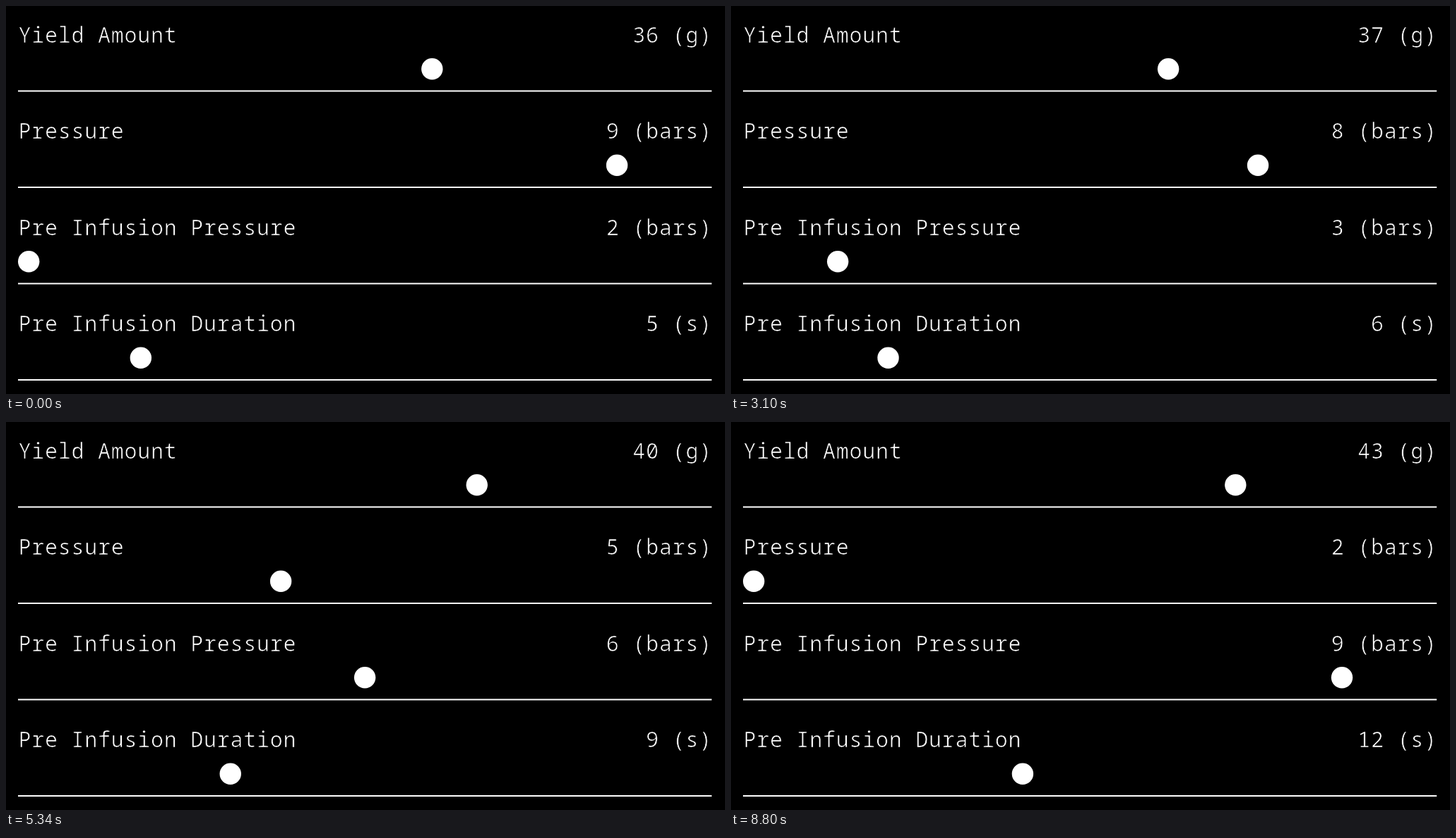
An HTML page that plays this animation: 1018x550 px, repeating every 8.9 s.

```html
<!DOCTYPE html>
<html lang="en">
<head>
<meta charset="utf-8">
<title>Brew settings</title>
<style>
  html, body { margin: 0; width: 100%; height: 100%; overflow: hidden; background: #000; }
  svg { display: block; width: 100vw; height: 100vh; }
  /* the black outline thins the letters to a light weight */
  text {
    font: 300 30px "Noto Sans Mono", "Liberation Mono", monospace;
    letter-spacing: .75px;
    fill: #fff;
    stroke: #000;
    stroke-width: .7;
    white-space: pre;
  }
  line { stroke: #fff; stroke-width: 2; }
  circle { fill: #fff; }
</style>
</head>
<body>
<svg id="stage" viewBox="0 0 1018 550"></svg>
<script>
const LOOP = 8900;
const FIRST_STEP = 2600, STEP = 760, STEPS = 7;
const LEFT = 17, RIGHT = 999.2, RADIUS = 15.2;
const PITCH = 136.5;   // row height
const CELL = 18.75;    // character advance
const INSET = .5;      // text offset
const BASELINE = 51.5;

const rows = [
  { label: "Yield Amount",          unit: "g",    start: 36, dir: 1,  min: 0, max: 60 },
  { label: "Pressure",              unit: "bars", start: 9,  dir: -1, min: 2, max: 10 },
  { label: "Pre Infusion Pressure", unit: "bars", start: 2,  dir: 1,  min: 2, max: 10 },
  { label: "Pre Infusion Duration", unit: "s",    start: 5,  dir: 1,  min: 0, max: 30 }
];

const stage = document.getElementById("stage");

function add(tag, attrs, content = "") {
  const el = document.createElementNS("http://www.w3.org/2000/svg", tag);
  for (const name in attrs) el.setAttribute(name, attrs[name]);
  el.textContent = content;
  return stage.appendChild(el);
}

rows.forEach((row, i) => {
  const y = i * PITCH;
  add("text", { x: LEFT + INSET, y: y + BASELINE }, row.label);
  row.readout = add("text", { y: y + BASELINE });
  row.knob = add("circle", { cy: y + 89.2, r: RADIUS });
  add("line", { x1: LEFT, x2: RIGHT, y1: y + 120.5, y2: y + 120.5 });
});

function setValue(row, value) {
  const text = `${value} (${row.unit})`;
  const share = (value - row.min) / (row.max - row.min);
  row.readout.textContent = text;
  row.readout.setAttribute("x", RIGHT + INSET - text.length * CELL);
  row.knob.setAttribute("cx", LEFT + RADIUS + share * (RIGHT - LEFT - 2 * RADIUS));
}

function draw(ms) {
  const t = ms % LOOP;
  const step = Math.floor((t - FIRST_STEP) / STEP) + 1;
  const n = Math.max(0, Math.min(STEPS, step));
  for (const row of rows) setValue(row, row.start + row.dir * n);
}

const began = performance.now();
function tick() {
  draw(performance.now() - began);
  requestAnimationFrame(tick);
}
draw(0);
requestAnimationFrame(tick);
</script>
</body>
</html>
```
